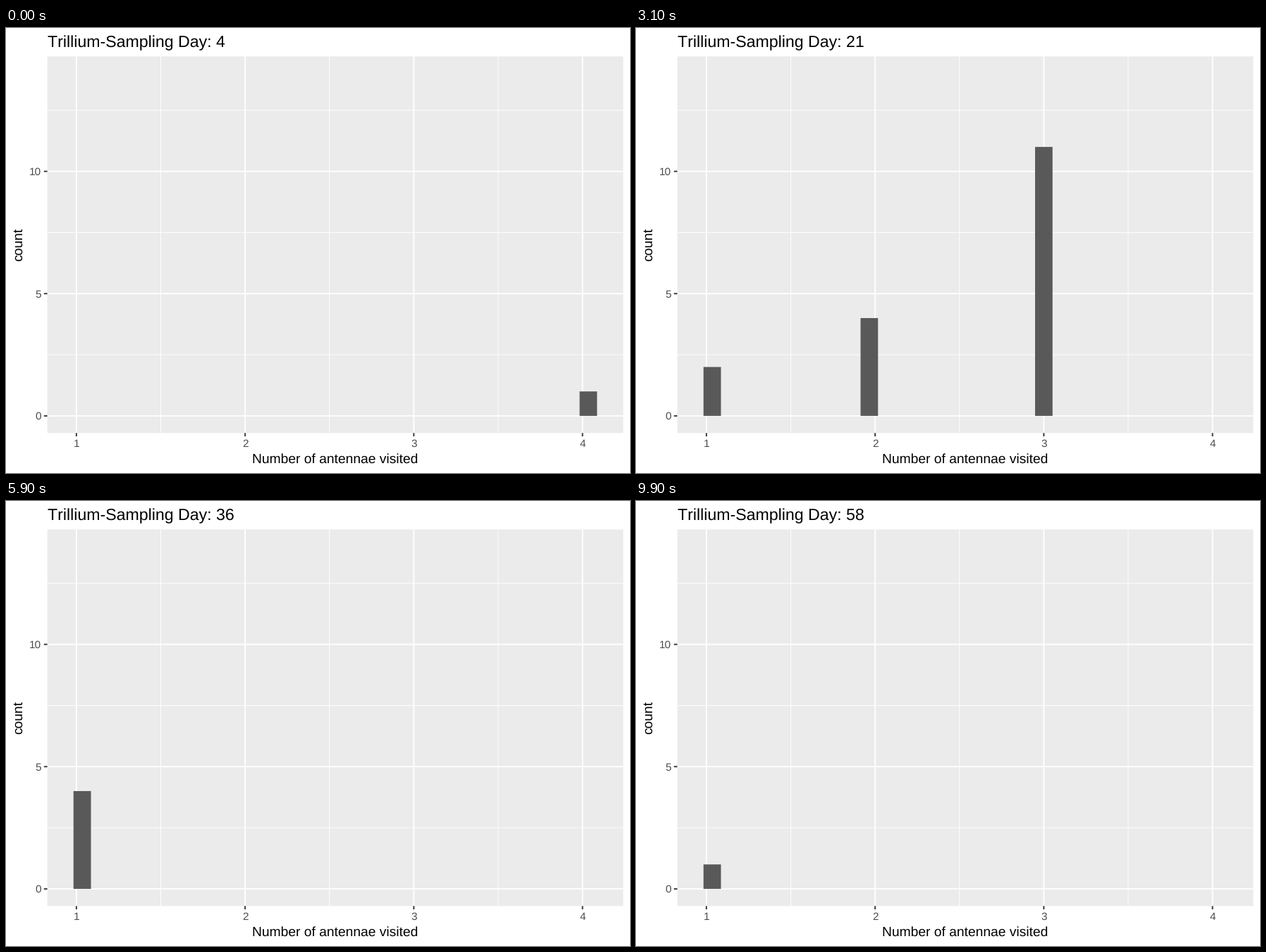
These frames come from a looping animation (885 px wide and 632 px high, 10000 ms). A matplotlib script:

```python
import matplotlib.pyplot as plt
import numpy as np
from matplotlib.animation import FuncAnimation
from matplotlib.patches import Rectangle

W, H, DPI = 885, 632, 128
FRAMES = 100
FIRST_DAY, LAST_DAY = 4, 58
PT = 72 / DPI  # points per pixel

# Panel edges in pixels; the data range is padded by 5 % on each side
LEFT, RIGHT, TOP, BOTTOM = 58.6, 875.4, 40.4, 575.2
BIN = 3 / 29
X_MIN, X_MAX = 8 * BIN, 41 * BIN
Y_MIN, Y_MAX = -0.7, 14.7

# Turning points (day, count) of each bar, by number of antennae
TURNS = {
    1: [(4, 0), (15, 10), (21, 2), (27, 1), (35, 0), (36, 4), (44, 5),
        (52, 2), (55, 2), (57, 1)],
    2: [(4, 0), (15, 8), (21, 4), (27, 0), (36, 0), (44, 1), (46, 0)],
    3: [(4, 0), (15, 9), (21, 11), (27, 0), (35, 1), (36, 0), (42, 1), (44, 0)],
    4: [(4, 1), (10, 0)],
}

plt.rcParams.update({
    "font.family": "Liberation Sans",
    "text.hinting": "none",
    "text.kerning_factor": 6,  # practically no kerning
})


def px(x):
    return LEFT + (x - X_MIN) / (X_MAX - X_MIN) * (RIGHT - LEFT)


def py(y):
    return BOTTOM - (y - Y_MIN) / (Y_MAX - Y_MIN) * (BOTTOM - TOP)


def day_at(i):
    return FIRST_DAY + i * (LAST_DAY - FIRST_DAY) / (FRAMES - 1)


def frame_of(day):
    return round((day - FIRST_DAY) * (FRAMES - 1) / (LAST_DAY - FIRST_DAY))


def count_at(i, turns):
    days, counts = zip(*turns)
    return np.interp(i, [frame_of(d) for d in days], counts)


fig = plt.figure(figsize=(W / DPI, H / DPI), dpi=DPI, facecolor="white")
ax = fig.add_axes([0, 0, 1, 1])
ax.set_xlim(0, W)
ax.set_ylim(H, 0)
ax.axis("off")


def line(x0, y0, x1, y1, color="white", width=1.87):
    ax.plot([x0, x1], [y0, y1], color=color, lw=width * PT, zorder=2,
            solid_capstyle="butt", snap=False)


def label(x, y, text, size, color="black", ha="center", **kw):
    return ax.text(x, y, text, fontsize=size * PT, color=color, ha=ha,
                   va="baseline", **kw)


def box(x0, y0, x1, y1, color, z):
    return ax.add_patch(Rectangle((x0, y0), x1 - x0, y1 - y0, fc=color, lw=0,
                                  zorder=z, snap=False))


def hgrid(y, width):
    line(LEFT, py(y), RIGHT, py(y), width=width)


def vgrid(x, width):
    line(px(x), TOP, px(x), BOTTOM, width=width)


box(LEFT, TOP, RIGHT, BOTTOM, "#EBEBEB", 0)

for y in (0, 5, 10):
    hgrid(y + 2.5, 0.93)
    hgrid(y, 1.87)
    line(LEFT - 4.8, py(y), LEFT, py(y), "#333333")
    label(LEFT - 8.7, round(py(y) + 5.4), str(y), 15.4, "#4D4D4D", "right")

for x in TURNS:
    if x < len(TURNS):
        vgrid(x + 0.5, 0.93)
    vgrid(x, 1.87)
    line(px(x), BOTTOM, px(x), BOTTOM + 4.8, "#333333")
    label(px(x), 595, str(x), 15.4, "#4D4D4D")

label((LEFT + RIGHT) / 2, 618, "Number of antennae visited", 19.25)
label(23.5, (TOP + BOTTOM) / 2, "count", 19.25, rotation=90,
      rotation_mode="anchor")
title = label(LEFT, 27, "", 23.1, ha="left")


def make_bar(x):
    k = round(x / BIN)  # nearest histogram bin
    return box(px((k - 0.5) * BIN), py(0), px((k + 0.5) * BIN), py(0),
               "#595959", 3)


bars = {x: make_bar(x) for x in TURNS}


def update(i):
    title.set_text(f"Trillium-Sampling Day: {round(day_at(i))}")
    for x, bar in bars.items():
        count = count_at(i, TURNS[x])
        bar.set_y(py(count))
        bar.set_height(py(0) - py(count))
        bar.set_visible(count > 0)
    return [title, *bars.values()]


anim = FuncAnimation(fig, update, frames=FRAMES, interval=100, repeat=True,
                     repeat_delay=0, blit=False)
plt.show()
```
